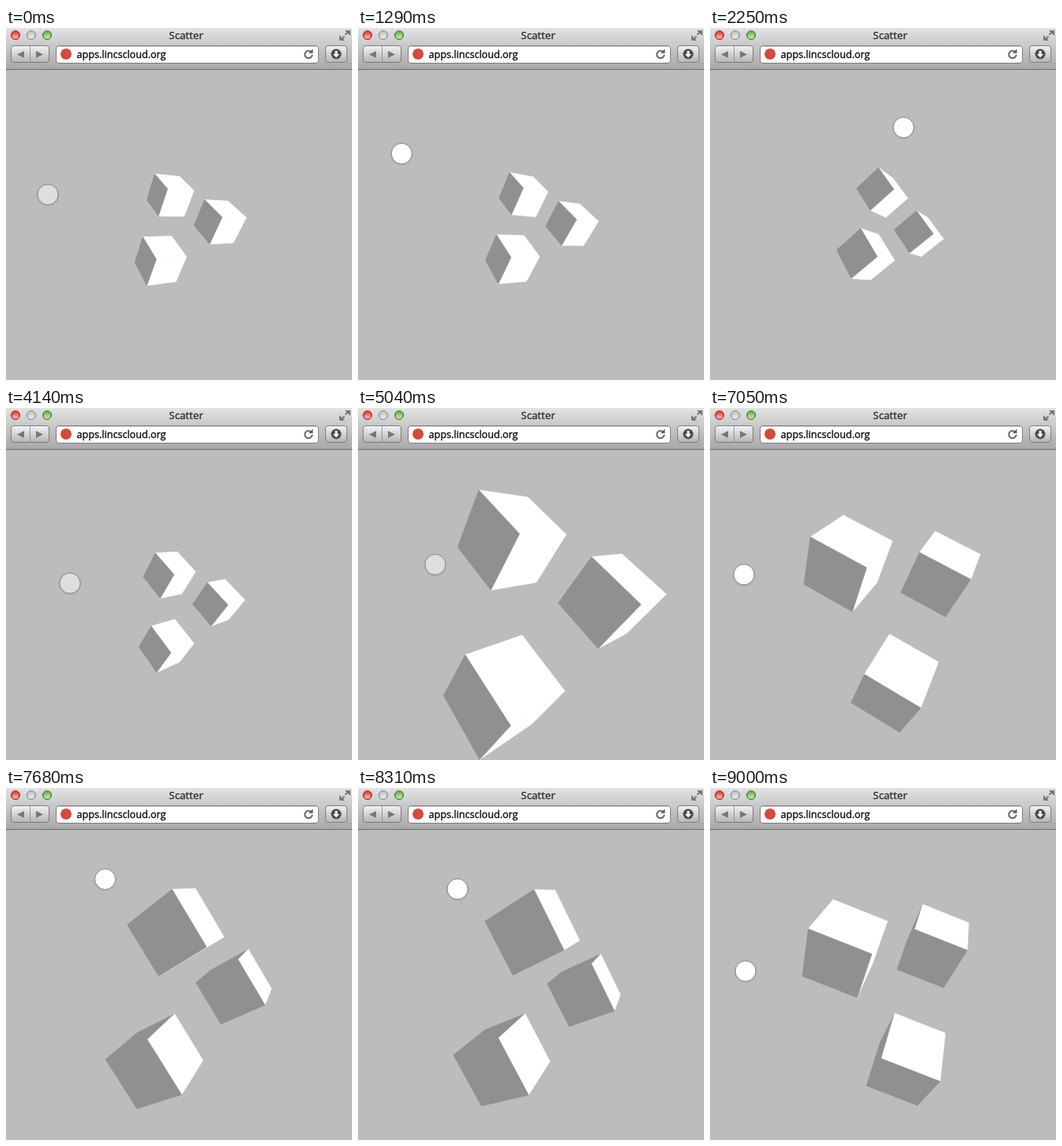
Write an HTML page with a canvas that moves like this. It is 438 by 446 pixels and loops after 9030 ms.

```html
<!DOCTYPE html>
<html lang="en">
<head>
<meta charset="utf-8">
<title>Scatter</title>
<style>
  html, body { margin: 0; width: 100%; height: 100%; overflow: hidden; background: #bcbcbc; }
  canvas, svg { position: absolute; left: 0; top: 0; display: block; }
  text { font-family: "Open Sans", "DejaVu Sans", sans-serif; stroke-width: .3; }
</style>
</head>
<body>
<canvas id="scene" width="438" height="446"></canvas>
<svg width="438" height="446" viewBox="0 0 438 446">
  <defs>
    <linearGradient id="bar" x2="0" y2="1">
      <stop offset="0" stop-color="#e2e2e2"/><stop offset="1" stop-color="#a8a8a8"/>
    </linearGradient>
    <linearGradient id="key" x2="0" y2="1">
      <stop offset="0" stop-color="#f4f4f4"/><stop offset="1" stop-color="#b4b4b4"/>
    </linearGradient>
    <linearGradient id="shine" x2="0" y2="1">
      <stop offset="0" stop-color="#fff" stop-opacity=".1"/><stop offset="1" stop-color="#fff" stop-opacity=".65"/>
    </linearGradient>
    <ellipse id="gloss" rx="4" ry="3.5" fill="url(#shine)"/>
  </defs>

  <rect width="438" height="52" fill="url(#bar)"/>
  <rect y="52" width="438" height="1" fill="#6c6c6c"/>

  <circle cx="12" cy="9" r="5.5" fill="#e8473f" stroke="#94302b"/>
  <circle cx="32" cy="9" r="5.5" fill="#c9c9c9" stroke="#858585"/>
  <circle cx="52" cy="9" r="5.5" fill="#74b84c" stroke="#47752e"/>
  <use href="#gloss" x="12" y="10"/>
  <use href="#gloss" x="32" y="10"/>
  <use href="#gloss" x="52" y="10"/>
  <text x="228" y="14" font-size="13.3" text-anchor="middle" fill="#262626" stroke="#262626">Scatter</text>
  <path d="M429 3h7v7z M429 16h-7v-7z" fill="#777"/>
  <path d="M429.500 8.500l4-4 M428.500 10.500l-4 4" stroke="#777" stroke-width="2"/>

  <g fill="url(#key)" stroke="#7d7d7d">
    <rect x="6.500" y="22.500" width="48" height="21" rx="3.500"/>
    <rect x="404.500" y="22.500" width="27" height="21" rx="3.500"/>
  </g>
  <path d="M30.500 23v20" stroke="#949494"/>
  <path d="M23 29v9l-9-4.500z M38 29v9l9-4.500z" fill="#777"/>
  <circle cx="418" cy="33" r="6.500" fill="#4b4b4b"/>
  <path d="M416.500 29h3v4h2.500l-4 4.500-4-4.500h2.500z" fill="#fff"/>

  <rect x="63.500" y="22.500" width="332" height="22" rx="3.500" fill="#fff" stroke="#7d7d7d"/>
  <path d="M65 23.500h329" stroke="#ccc"/>
  <circle cx="76" cy="33" r="7" fill="#d4493b"/>
  <text x="89.500" y="38" font-size="12.6" stroke="#000">apps.lincscloud.org</text>
  <path d="M386.300 30.200a4.700 4.700 0 1 0 1.400 3.500" fill="none" stroke="#5c5c5c" stroke-width="1.9"/>
  <path d="M388.500 26.500v5.500h-5.500z" fill="#5c5c5c"/>

  <g id="cursor">
    <circle cy=".7" r="13.700" fill="none" stroke="#000" stroke-opacity=".1"/>
    <circle id="dot" r="13" stroke="#8a8a8a"/>
  </g>
</svg>
<script>
const LOOP = 9030, FOCAL = 365, CX = 219, CY = 250;
const ctx = document.getElementById('scene').getContext('2d');
const cursor = document.getElementById('cursor');
const dot = document.getElementById('dot');

// Cube centres, in units of the edge length.
const cubes = [[-.845, .63, .155], [.655, .6, -.975], [.885, -.64, .935]];

// Orientations in degrees: roll, tilt, pan.
const rest = [21, 29, -51], turned = [49, 16, -28.5], corner = [33, 35.5, -28.5];
const upright = [23, 43, -9], rolled = [65.5, 28, 5.5], level = [22.5, 43.5, 1.5];

// Camera distances.
const far = 9.5, near = 5.5, close = 4.33;

// Time, cursor place, orientation and distance at each turning point.
const stops = [
  stop(0, 53, 211, rest, far),
  stop(930, 23, 206, rest, far),
  stop(2250, 245, 126, turned, far),
  stop(3750, 20, 208, corner, far),
  stop(4140, 81, 222, corner, far),
  stop(5200, 99, 197, corner, close),
  stop(5850, 99, 197, corner, near),
  stop(7050, 43, 211, upright, near),
  stop(7850, 140, 109, rolled, near),
  stop(8310, 126, 128, rolled, near),
  stop(9000, 45, 232, level, near)
];
const isPressed = t => (t >= 930 && t < 3750) || t >= 5850;

// The cursor is kept in polar form, as it swings around the centre.
function stop(time, x, y, pose, distance) {
  const dx = x - CX, dy = y - CY;
  return { time, state: [Math.atan2(dy, dx), Math.hypot(dx, dy), distance, ...pose] };
}

function stateAt(t) {
  const next = stops.findIndex(s => s.time > t);
  if (next < 0) return stops[stops.length - 1].state;
  const a = stops[next - 1], b = stops[next];
  const u = (t - a.time) / (b.time - a.time), eased = u * u * (3 - 2 * u);
  return a.state.map((v, i) => v + (b.state[i] - v) * eased);
}

// Cube axes in camera space: right, down, depth.
function axesOf(angles) {
  const [r, t, p] = angles.map(a => a * Math.PI / 180);
  const { sin, cos } = Math;
  const roll = ([x, y, z]) => [x * cos(r) - y * sin(r), x * sin(r) + y * cos(r), z];
  return [
    roll([cos(p), -sin(p) * sin(t), sin(p) * cos(t)]),
    roll([0, -cos(t), -sin(t)]),
    roll([sin(p), cos(p) * sin(t), -cos(p) * cos(t)])
  ];
}

const dotProduct = (a, b) => a[0] * b[0] + a[1] * b[1] + a[2] * b[2];

function drawCube(center, axes) {
  for (let n = 0; n < 3; n++) {
    for (const side of [-1, 1]) {
      const mid = center.map((v, i) => v + axes[n][i] * side / 2);
      if (dotProduct(mid, axes[n]) * side >= 0) continue;
      const p = axes[(n + 1) % 3], q = axes[(n + 2) % 3];
      ctx.beginPath();
      for (const [a, b] of [[-.5, -.5], [.5, -.5], [.5, .5], [-.5, .5]]) {
        const [x, y, z] = mid.map((v, i) => v + p[i] * a + q[i] * b);
        ctx.lineTo(CX + FOCAL * x / z, CY + FOCAL * y / z);
      }
      ctx.closePath();
      // The light reaches the +x, +y and -z sides.
      const lit = n === 2 ? side < 0 : side > 0;
      ctx.fillStyle = ctx.strokeStyle = lit ? '#fff' : '#909090';
      ctx.fill();
      ctx.stroke();
    }
  }
}

function draw(t) {
  const [angle, radius, distance, ...pose] = stateAt(t);
  const axes = axesOf(pose);
  const place = c => [0, 1, 2].map(i =>
    dotProduct(c, axes.map(axis => axis[i])) + (i === 2 ? distance : 0));

  ctx.clearRect(0, 0, 438, 446);
  ctx.lineWidth = .7;
  ctx.lineJoin = 'round';
  cubes.map(place).sort((a, b) => b[2] - a[2]).forEach(c => drawCube(c, axes));

  const x = CX + radius * Math.cos(angle), y = CY + radius * Math.sin(angle);
  cursor.setAttribute('transform', `translate(${x} ${y})`);
  dot.setAttribute('fill', isPressed(t) ? '#fff' : '#dedede');
}

function tick() {
  draw(performance.now() % LOOP);
  requestAnimationFrame(tick);
}
tick();
</script>
</body>
</html>
```
